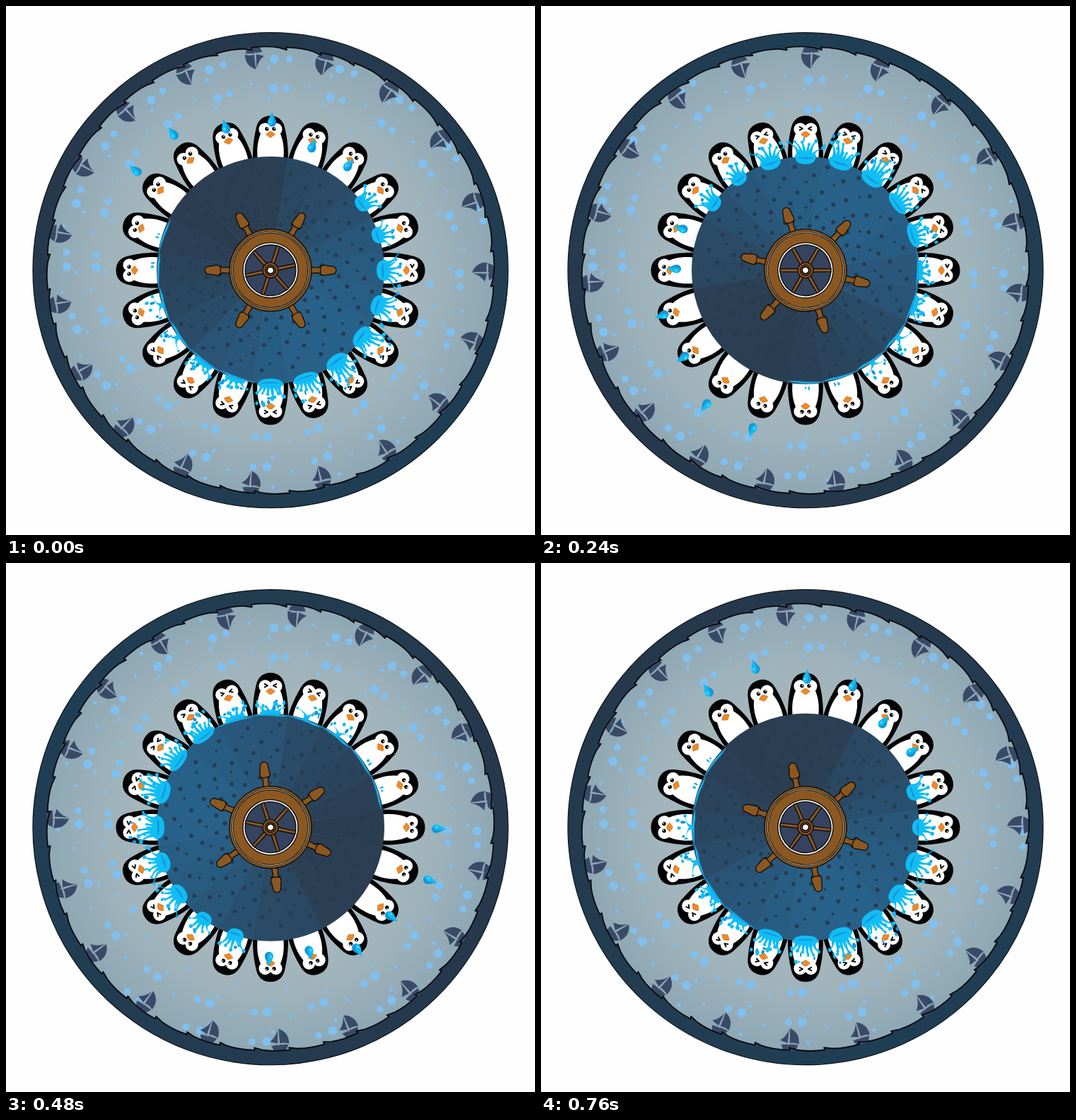
An HTML page for the animation above (800 ms loop, 748 px wide and 748 px high).

```html
<!DOCTYPE html>
<html lang="en">
<head>
<meta charset="utf-8">
<title>Spinning disc</title>
<style>
html, body { margin: 0; width: 100%; height: 100%; overflow: hidden; background: #fefefe; }
svg { display: block; width: 100vw; height: 100vh; }
</style>
</head>
<body>
<svg viewBox="0 0 748 748">
  <defs>
    <radialGradient id="sky" gradientUnits="userSpaceOnUse" cx="0" cy="0" r="320">
      <stop offset=".5" stop-color="#a9b8be"/>
      <stop offset=".72" stop-color="#9fb3bb"/>
      <stop offset="1" stop-color="#8da7b4"/>
    </radialGradient>
  </defs>
  <g transform="translate(374 373.7)"><g id="disc"></g></g>
</svg>
<script>
const STEPS = 20, STEP_MS = 40, PITCH = 360 / STEPS;
const WATER = '#10bdf4', DEEP = '#1795d6';
const disc = document.getElementById('disc');

let seed = 7;
const rnd = () => (seed = (seed * 16807) % 2147483647) / 2147483647;
const f = n => +n.toFixed(2);
const range = (n, fn) => Array.from({ length: n }, (_, i) => fn(i)).join('');
const turn = (deg, body) => `<g transform="rotate(${f(deg)})">${body}</g>`;
const path = (d, fill, extra = '') => `<path d="${d}" fill="${fill}" ${extra}/>`;
const circle = (x, y, r, fill, extra = '') =>
  `<circle cx="${f(x)}" cy="${f(y)}" r="${f(r)}" fill="${fill}" ${extra}/>`;

// Angles run clockwise from the top.
function polar(r, deg) {
  const a = deg * Math.PI / 180;
  return [f(r * Math.sin(a)), f(-r * Math.cos(a))];
}
function mix(a, b, k) {
  return `rgb(${a.map((v, i) => Math.round(v + (b[i] - v) * k))})`;
}
const glow = deg => 0.5 + 0.5 * Math.cos((deg - 138) * Math.PI / 180);

// Dots in each sector sit a little further out than in the one before.
function dots(list, pitch, min, max, fill) {
  return range(STEPS, s => list.map(([a, r0, size]) => {
    let out = '';
    const first = r0 + pitch * s / STEPS;
    for (let r = first - Math.floor((first - min) / pitch) * pitch; r < max; r += pitch) {
      out += circle(...polar(r, s * PITCH + a), size, fill);
    }
    return out;
  }).join(''));
}

function ring() {
  const sectors = range(STEPS, i => {
    const a = i * PITCH;
    const [x0, y0] = polar(336, a - 9.2), [x1, y1] = polar(336, a + 9.2);
    const [x2, y2] = polar(300, a + 9.2), [x3, y3] = polar(300, a - 9.2);
    return path(`M${x0},${y0}A336,336 0 0 1 ${x1},${y1}L${x2},${y2}A300,300 0 0 0 ${x3},${y3}Z`,
      mix([38, 56, 76], [32, 62, 83], glow(a)));
  });
  return sectors + circle(0, 0, 336, 'none', 'stroke="#0b1219" stroke-width="1.2"');
}

function waveEdge() {
  let d = 'M' + polar(312.5, -4.8);
  for (let i = 0; i < 40; i++) {
    const a = i * 9 - 4.8;
    d += `L${polar(316, a - 0.2)}Q${polar(317.8, a + 4)} ${polar(315, a + 7)}L${polar(312.5, a + 9)}`;
  }
  return d + 'Z';
}

function boat() {
  const navy = '#394a67', seam = '#8da5b8';
  return path('M12,-309Q0,-307 -12,-308Q-10,-315 -6,-317H8Z', navy) +
    path('M2,-286Q5,-297 14,-303L3,-306Z', navy) +
    path('M1,-285Q-14,-291 -13,-307Q-6,-304 0,-306Z', navy) +
    path('M1.5,-287L1.5,-309M-13,-307.5Q-4,-305 1,-307Q8,-308 12,-306', 'none',
      `stroke="${seam}" stroke-width="1.2"`);
}

function penguin(shut) {
  const eye = x => circle(x, -200, 2.7, '#050505') + circle(x + 1, -201, 0.9, '#fff');
  const face = shut
    ? path('M-9,-203l5,2.6l-5,2.6M9,-203l-5,2.6l5,2.6', 'none',
        'stroke="#050505" stroke-width="1.9" stroke-linejoin="round"')
    : eye(-5) + eye(5);
  return path('M0,-218.5C12,-218.5 19,-211 21,-198C23,-188 26,-174 24.5,-150H-24.5C-26,-174 -23,-188 -21,-198C-19,-211 -12,-218.5 0,-218.5Z', '#030303') +
    circle(-7.5, -199.5, 9, '#fff') + circle(7.5, -199.5, 9, '#fff') +
    path('M-12,-197C-18,-186 -21,-170 -17,-150H17C21,-170 18,-186 12,-197Z', '#fff') + face +
    path('M-6.5,-192Q-3,-196 0,-196.5Q3,-196 6.5,-192L0,-187.5Z', '#ee8a25', 'stroke="#b75c12" stroke-width=".5"');
}

function hub() {
  return range(STEPS, i => {
    const a = i * PITCH;
    const [x0, y0] = polar(161, a - 9.1), [x1, y1] = polar(161, a + 9.1);
    return path(`M0,0L${x0},${y0}A161,161 0 0 1 ${x1},${y1}Z`,
      mix([43, 61, 81], [40, 97, 137], Math.min(1, Math.max(0, glow(a) + (rnd() - 0.5) * 0.1))));
  });
}

function drop(r) {
  return `<g transform="translate(2 ${-r})">` +
    path('M0,-11C2,-4 6,-1 6,4A6,6 0 0 1 -6,4C-6,-1 -2,-4 0,-11Z', WATER) +
    path('M0,-11C2,-4 6,-1 6,4A6,6 0 0 1 -3,9C3,7 3,0 0,-11Z', DEEP) +
    circle(-2.5, 3, 1.3, '#7fe2ff') + '</g>';
}

// w, h: reach; base, depth: foot; n: arms; bits: loose droplets; film: sheet along the rim
function splash({ w, h, base, depth, n, bits, film }) {
  let out = '';
  if (film) {
    const [x0, y0] = polar(160, -9.5), [x1, y1] = polar(158.5, 9.5);
    const [x2, y2] = polar(159 - film, 5), [x3, y3] = polar(160 - film, -4);
    out += path(`M${x0},${y0}Q0,-163 ${x1},${y1}L${x2},${y2}Q0,-158 ${x3},${y3}Z`, WATER) +
      path(`M${x0},${y0}Q0,-159 ${x2},${y2}`, 'none', `stroke="${DEEP}" stroke-width="1"`);
  }
  if (base) {
    out += path(`M${-base},-163Q${-base},${-161 + depth} 0,${-161 + depth}Q${base},${-161 + depth} ${base},-163Q0,-170 ${-base},-163Z`, WATER) +
      path(`M${-base * 0.7},-159Q0,-165 ${base * 0.8},-160Q${base * 0.3},${-160 + depth * 0.5} ${-base * 0.7},-159Z`, DEEP);
  }
  for (let i = 0; i < n; i++) {
    const u = n > 1 ? 2 * i / (n - 1) - 1 : 0;
    const x = w * u, y = -163 - h * (0.45 + 0.55 * rnd()) * (1 - 0.2 * u * u), b = base * 0.65 * u;
    out += path(`M${f(b - 4)},-160Q${f(b)},${f(y * 0.5 - 83)} ${f(x - 1.3)},${f(y)}L${f(x + 1.3)},${f(y)}Q${f(b + 2)},${f(y * 0.5 - 83)} ${f(b + 4)},-160Z`, WATER) +
      circle(x, y, 1.6 + rnd() * 1.3, WATER);
  }
  for (let i = 0; i < bits; i++) {
    const x = (rnd() * 2 - 1) * (w + 2), y = -165 - h * (0.25 + rnd());
    out += `<ellipse cx="${f(x)}" cy="${f(y)}" rx="${f(1 + rnd() * 1.7)}" ry="${f(1.5 + rnd() * 2.2)}" fill="${i % 3 ? WATER : DEEP}"/>`;
  }
  return out;
}

const stages = [
  { w: 18, h: 20, base: 12, depth: 10, n: 5, bits: 1 },
  { w: 25, h: 24, base: 15, depth: 11, n: 6, bits: 3 },
  { w: 21, h: 27, base: 17, depth: 11, n: 6, bits: 8 },
  { w: 19, h: 22, base: 18, depth: 8, n: 6, bits: 9 },
  { w: 19, h: 14, base: 15, depth: 3, n: 4, bits: 8, film: 1.5 },
  { w: 16, h: 13, base: 0, depth: 0, n: 2, bits: 5, film: 2.5 },
  { w: 15, h: 3, base: 0, depth: 0, n: 0, bits: 2, film: 1.8 }
];
const falling = { 17: 238, 18: 238, 19: 213, 0: 213, 1: 186, 2: 186 };

function water(p) {
  if (p in falling) return drop(falling[p]);
  return splash(stages[Math.floor((p - 3) / 2)]);
}

function wheel() {
  const wood = '#8c5822', line = 'stroke="#0a0a0a" stroke-width="1.3"';
  const handle = path('M-4.5,-55L-3.5,-68Q-8,-72 -7,-77L-5,-90Q0,-96 5,-90L7,-77Q8,-72 3.5,-68L4.5,-55Z', wood, line) +
    path('M-6.5,-72Q0,-69 6.5,-72', 'none', line);
  const spoke = path('M-2.4,-8L-2,-36H2L2.4,-8Z', wood, line);
  return range(6, i => turn(30 + i * 60, handle)) +
    circle(0, 0, 58, wood, line) +
    circle(0, 0, 53.5, wood, 'stroke="#0a0a0a" stroke-width="2.6"') +
    circle(0, 0, 53.8, 'none', 'stroke="#cfc3ae" stroke-width=".9"') +
    circle(0, 0, 37.5, '#35435e', 'stroke="#0a0a0a" stroke-width="4.4"') +
    circle(0, 0, 37.5, 'none', 'stroke="#f4f4f4" stroke-width="1.8"') +
    range(6, i => turn(18 + i * 60, spoke)) +
    circle(0, 0, 11, wood, line) + circle(0, 0, 7.5, wood, line) +
    circle(0, 0, 4.8, '#fff', 'stroke="#0a0a0a" stroke-width="2"');
}

const snow = [[1, 256.5, 6.4], [-0.6, 243.5, 2.6], [5, 258, 5], [-6, 265, 2.2]];
const specks = [[-6, 100, 2.9], [0.5, 114, 1.9], [5, 88, 2.9]];

disc.innerHTML =
  ring() + path(waveEdge(), 'url(#sky)') +
  dots(snow, 42, 226, 309, '#80bfee') +
  range(19, i => turn(-4.35 + i * 360 / 19, boat())) +
  path(waveEdge(), 'none', 'stroke="#07090c" stroke-width="1.8" stroke-linejoin="round"') +
  range(STEPS, p => turn(p * PITCH, penguin(p >= 5 && p <= 13))) +
  hub() + dots(specks, 36, 62, 152, '#253c53') +
  range(STEPS, p => turn(p * PITCH, water(p))) +
  wheel();

const start = performance.now();
function draw(now) {
  const step = Math.floor(Math.max(0, now - start) / STEP_MS) % STEPS;
  disc.setAttribute('transform', `rotate(${-PITCH * step})`);
  requestAnimationFrame(draw);
}
draw(start);
</script>
</body>
</html>
```
